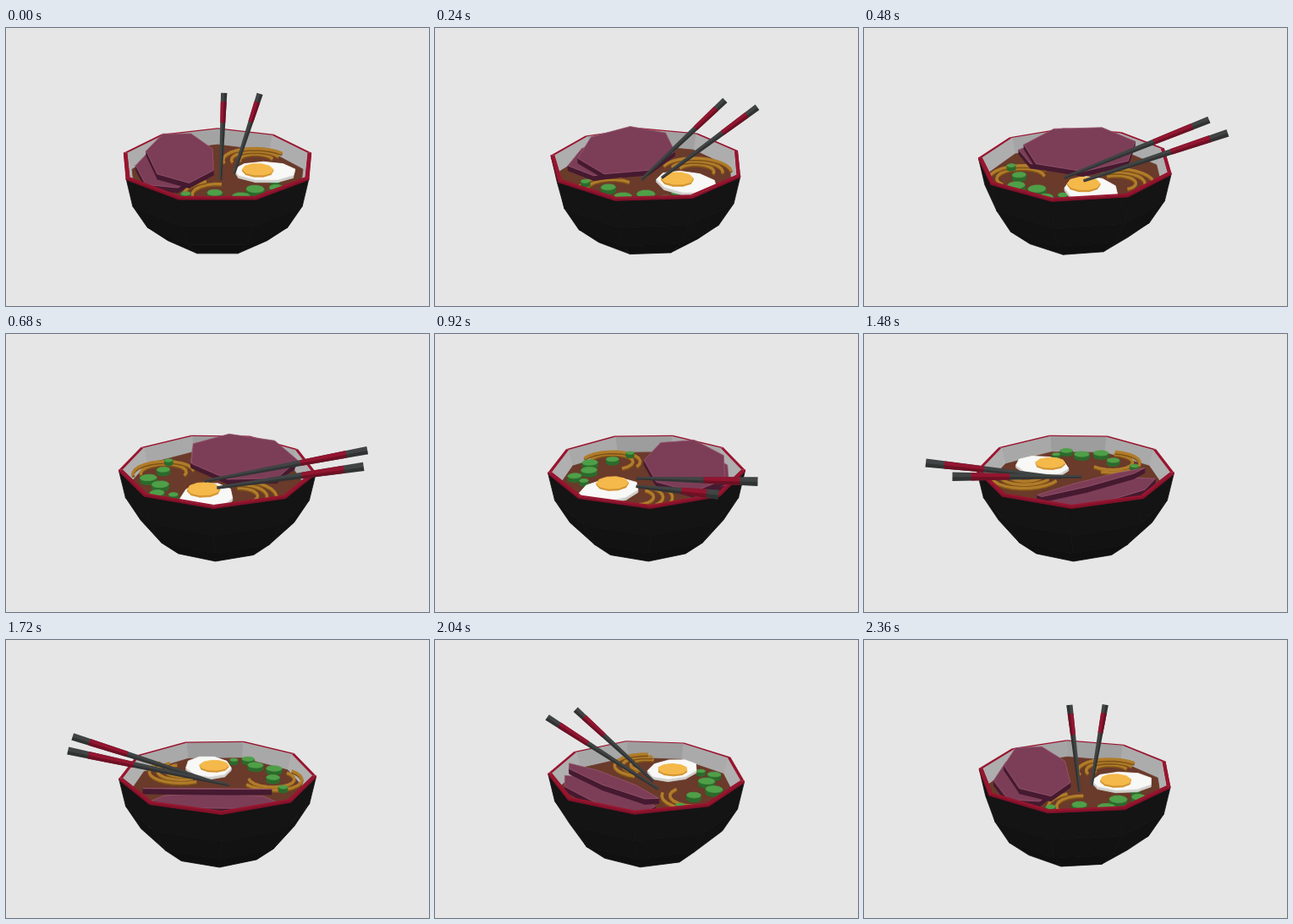
Recreate the animation shown at these times as an HTML page with a canvas. Size 500 by 329 pixels, loop 2.4 s.

```html
<!DOCTYPE html>
<html lang="en">
<head>
<meta charset="utf-8">
<title>Ramen bowl</title>
<style>
html, body { margin: 0; height: 100%; overflow: hidden; background: #e6e6e6; }
canvas { display: block; width: 500px; height: 329px; }
</style>
</head>
<body>
<canvas id="stage"></canvas>
<script>
const canvas = document.getElementById('stage');
const ratio = window.devicePixelRatio || 1;
canvas.width = 500 * ratio;
canvas.height = 329 * ratio;
const ctx = canvas.getContext('2d');
ctx.scale(ratio, ratio);
ctx.lineJoin = 'round';

const LOOP = 2400, STEP = 40, RAD = Math.PI / 180;
const SCALE = 115.2, DIST = 6.2, SIN = 0.366, COS = 0.93;
let turnCos = 1, turnSin = 0;

const repeat = (n, make) => Array.from({ length: n }, (_, i) => make(i));

// Spin a point around the bowl axis; x right, y up, z towards the viewer.
const spin = ([x, y, z]) => [x * turnCos - z * turnSin, y, z * turnCos + x * turnSin];

function project(point) {
  const [x, y, z] = spin(point);
  const d = 1 - (z * COS + y * SIN) / DIST;
  return [250 + SCALE * x / d, 156 + SCALE * (z * SIN - y * COS) / d, d];
}

function trace(pts) {
  ctx.beginPath();
  pts.forEach(([x, y]) => ctx.lineTo(x, y));
}

function fill(pts, color) {
  trace(pts);
  ctx.closePath();
  ctx.fillStyle = color;
  ctx.fill();
}

// Fill a face only when it turns towards the camera.
function face(points, color, edge = color) {
  const pts = points.map(project);
  const area = pts.reduce((sum, [x, y], i) => {
    const [nx, ny] = pts[(i + 1) % pts.length];
    return sum + x * ny - nx * y;
  }, 0);
  if (area >= 0) return;
  fill(pts, color);
  ctx.strokeStyle = edge;
  ctx.lineWidth = 0.8;
  ctx.stroke();
}

function band(upper, lower, color) {
  upper.forEach((p, i) => {
    const j = (i + 1) % upper.length;
    face([p, lower[i], lower[j], upper[j]], color);
  });
}

function prism(top, height, topColor, sideColor, edgeColor) {
  const low = top.map(([x, y, z]) => [x, y - height, z]);
  face([...low].reverse(), sideColor);
  band(top, low, sideColor);
  face(top, topColor, edgeColor);
}

const oval = (cx, cz, rx, rz, y, sides) => repeat(sides, i => {
  const a = (i + 0.5) * 2 * Math.PI / sides;
  return [cx + rx * Math.sin(a), y, cz + rz * Math.cos(a)];
});
const ring = (radius, y) => oval(0, 0, radius, radius, y, 9);

// Bowl: the lower part of a sphere in steps of 18 degrees
const rimTop = ring(1, 0.012), rimLow = ring(1, -0.008), rimInner = ring(0.963, 0.012);
const wallLow = ring(0.9, -0.25), soup = ring(0.92, -0.17);
const shell = repeat(4, i => ring(Math.cos(18 * i * RAD), -0.963 * Math.sin(18 * i * RAD)));

function drawInside() {
  rimInner.forEach((p, i) => {
    const j = (i + 1) % 9;
    const side = Math.abs(spin(p)[0] + spin(rimInner[j])[0]) / 2;
    const g = Math.round(156 + 22 * side);
    face([rimInner[j], wallLow[j], wallLow[i], p], `rgb(${g},${g},${g})`);
  });
}

function drawRim(frontOnly) {
  rimTop.forEach((p, i) => {
    const j = (i + 1) % 9;
    if (frontOnly && spin(p)[2] + spin(rimTop[j])[2] < 0) return;
    fill([p, rimTop[j], rimInner[j], rimInner[i]].map(project), '#98152f');
  });
}

function drawShell() {
  for (let i = 0; i < 3; i++) {
    const g = 20 - 2 * i;
    band(shell[i], shell[i + 1], `rgb(${g},${g},${g})`);
  }
  band(rimTop, rimLow, '#86112a');
  drawRim(true);
}

function drawNoodle(cx, cz, radius, from, to) {
  const pts = repeat(13, i => {
    const a = (from + (to - from) * i / 12) * RAD;
    return project([cx + radius * Math.cos(a), -0.12, cz + radius * Math.sin(a)]);
  });
  for (const [color, drop] of [['#7f5218', 1.6], ['#b07c2a', 0]]) {
    trace(pts.map(([x, y]) => [x, y + drop]));
    ctx.strokeStyle = color;
    ctx.lineWidth = 3.4;
    ctx.stroke();
  }
}

function drawNoodles() {
  for (let i = 0; i < 3; i++) drawNoodle(0.42, -0.3, 0.18 + 0.09 * i, 165, 350 - 12 * i);
  for (let i = 0; i < 2; i++) drawNoodle(0, 0.58, 0.24 + 0.08 * i, 60, 280 - 30 * i);
}

// Scallions lie along an arc, alternately further in and out, largest in the middle.
const scallions = repeat(6, i => {
  const a = (-26 + 25 * i - 1.5 * i * i) * RAD;
  const reach = (i % 2 ? 0.575 : 0.68) + 0.015 * i;
  const size = 0.045 + 0.043 * Math.sin(i * 36 * RAD);
  return oval(reach * Math.sin(a), reach * Math.cos(a), size, size, -0.1, 10);
});

const eggWhite = oval(0.49, 0, 0.32, 0.25, -0.12, 9);
const yolk = oval(0.412, 0.05, 0.158, 0.158, -0.085, 10);

// Meat slices lean against the wall; the oval is laid out as sideways and outwards.
const meat = (side, out, slope, base) => oval(side, out, 0.63, 0.335, 0, 7).map(([s, , o]) =>
  [-0.974 * o - 0.225 * s, slope * o + base, -0.225 * o + 0.974 * s]);
const slices = [meat(-0.03, 0.5, 0.2, -0.2), meat(-0.09, 0.4, 0.418, -0.187)];

// Chopsticks: handle end, soup end
const sticks = [
  [[0.08, 0.31, -1.47], [0.03, -0.17, 0.13]],
  [[0.52, 0.31, -1.43], [0.17, -0.17, -0.03]]
];

function drawStick([handle, end]) {
  const at = t => {
    const [x, y, d] = project(handle.map((v, i) => v + (end[i] - v) * t));
    return { x, y, half: SCALE * (0.038 - 0.023 * t) / d };
  };
  const a = at(0), b = at(1), length = Math.hypot(b.x - a.x, b.y - a.y);
  const flip = b.x < a.x ? -1 : 1;
  const nx = flip * (a.y - b.y) / length, ny = flip * (b.x - a.x) / length;
  const strip = (from, to, inner, color) => {
    const p = at(from), q = at(to);
    const edge = (e, k) => [e.x + nx * e.half * k, e.y + ny * e.half * k];
    fill([edge(p, inner), edge(q, inner), edge(q, 1), edge(p, 1)], color);
  };
  strip(0, 1, -1, '#414444');
  strip(0.12, 0.39, -1, '#931530');
  strip(0, 1, 0.1, 'rgba(0,0,0,0.25)');
}

const byDepth = (items, key) => [...items].sort((a, b) => spin(key(a))[2] - spin(key(b))[2]);

function draw(time) {
  const angle = Math.floor(time % LOOP / STEP) * STEP / LOOP * 2 * Math.PI;
  turnCos = Math.cos(angle);
  turnSin = Math.sin(angle);
  ctx.fillStyle = '#e6e6e6';
  ctx.fillRect(0, 0, 500, 329);

  drawInside();
  drawRim(false);
  face(soup, '#6a3a2a');
  drawNoodles();
  byDepth(scallions, top => top[0]).forEach(top => prism(top, 0.045, '#4f9f48', '#2c6a2c'));
  prism(eggWhite, 0.03, '#f8f8f6', '#cfcfcb');
  prism(yolk, 0.02, '#f4b94a', '#d2922f');
  slices.forEach(top => prism(top, 0.055, '#7c3e57', '#451a30', '#98566f'));
  drawShell();
  byDepth(sticks, stick => stick[0]).forEach(drawStick);
}

function tick() {
  draw(performance.now());
  requestAnimationFrame(tick);
}
tick();
</script>
</body>
</html>
```
